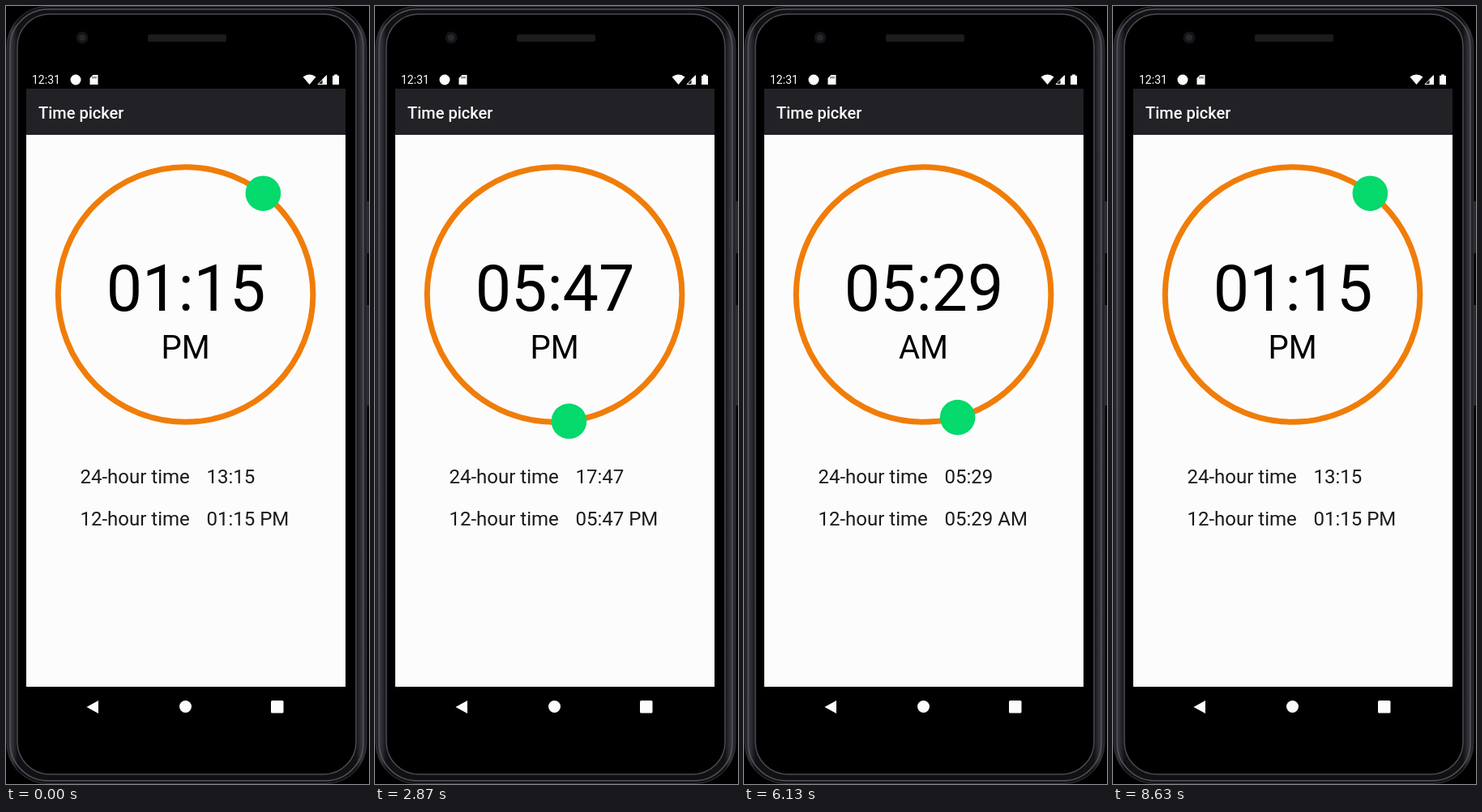
An HTML page that plays this animation: 448 by 960 pixels, repeating every 8660 ms.

```html
<!DOCTYPE html>
<html lang="en">
<head>
<meta charset="utf-8">
<title>Time picker</title>
<style>
  html, body { margin: 0; width: 100%; height: 100%; overflow: hidden; background: #000; }
  svg { display: block; width: 448px; height: 960px; font-family: Roboto, "Noto Sans", sans-serif; }
  .light { fill: #fdfcfd; }
  .label { font-size: 24px; fill: #1a1a1c; }
  .mid { text-anchor: middle; fill: #000; }
</style>
</head>
<body>
<svg viewBox="0 0 448 960">
  <defs>
    <linearGradient id="side">
      <stop offset="0" stop-color="#1b1b1f"/>
      <stop offset=".013" stop-color="#36353c"/>
      <stop offset=".03" stop-color="#111114"/>
      <stop offset=".97" stop-color="#111114"/>
      <stop offset=".987" stop-color="#36353c"/>
      <stop offset="1" stop-color="#1b1b1f"/>
    </linearGradient>
  </defs>

  <!-- Phone body -->
  <g fill="#29292d">
    <rect x="444" y="241" width="4" height="64"/>
    <rect x="444" y="369" width="4" height="124"/>
  </g>
  <rect x="1" y=".5" width="444" height="959" rx="50" fill="url(#side)" stroke="#34343a"/>
  <rect x="5" y="4" width="436" height="952" rx="47" fill="none" stroke="#54535d" stroke-width="1.5"/>
  <rect x="14" y="10" width="418" height="938" rx="40" fill="#000" stroke="#4b4a53" stroke-width="1.5"/>
  <circle cx="94" cy="39" r="7.5" fill="#141417"/>
  <circle cx="94" cy="39" r="4" fill="#27272c"/>
  <rect x="175" y="35" width="97" height="9" rx="2" fill="#1c1c1f"/>

  <!-- Status bar -->
  <g class="light">
    <text x="32" y="96" font-size="14">12:31</text>
    <circle cx="86" cy="91" r="6.5"/>
    <path d="M107.5 85H113.5V97H103.5V89Z"/>
    <path d="M366.5 87.5Q374.5 81.5 382.5 87.5L374.5 97Z"/>
    <path d="M396 85V97H390.5V90.5Z"/>
    <path d="M395.5 86V96.5H385Z" fill="none" stroke="#fdfcfd"/>
    <path d="M405 84.500H409V86H411V97H403V86H405Z"/>
  </g>
  <path d="M107 87v2.500m2-2.500v2.500m2-2.500v2.500" stroke="#000" stroke-width=".8"/>

  <!-- App -->
  <rect x="25" y="102" width="394" height="57" fill="#222126"/>
  <rect x="25" y="159" width="394" height="681" fill="#fdfcfd"/>
  <text class="light" x="40" y="139" font-size="20" font-weight="500">Time picker</text>
  <circle cx="221.6" cy="356" r="157.3" fill="none" stroke="#f07d08" stroke-width="7"/>
  <text id="clock" class="mid" x="222" y="376" font-size="79"></text>
  <text id="half" class="mid" x="221.5" y="435" font-size="40"></text>
  <g class="label">
    <text x="91.500" y="589">24-hour time</text>
    <text x="91.500" y="641">12-hour time</text>
    <text id="full" x="247.500" y="589"></text>
    <text id="short" x="247.500" y="641"></text>
  </g>
  <circle id="knob" r="21.8" fill="#04d96c"/>

  <!-- Navigation -->
  <g class="light">
    <path d="M99.500 865L114 857V873Z"/>
    <circle cx="221.500" cy="864.500" r="7.500"/>
    <rect x="327" y="857" width="15.500" height="15.500" rx="1.500"/>
  </g>
</svg>
<script>
  const LOOP = 8660;
  // Drag path: [time in ms, minutes after noon]
  const drag = [
    [0, 75], [800, 75], [1640, 146], [1970, 192], [3430, 443], [3770, 495],
    [4330, 683], [4870, 793], [5250, 838], [6130, 1049], [7130, 1251],
    [7930, 1450], [8300, 1502], [8560, 1515], [LOOP, 1515]
  ];
  const slope = i => (drag[i + 1][1] - drag[i][1]) / (drag[i + 1][0] - drag[i][0]);

  // Harmonic mean keeps the curve from turning back between points.
  const tangents = drag.map((_, i) => {
    if (i === 0 || i === drag.length - 1) return 0;
    const a = slope(i - 1), b = slope(i);
    return a * b > 0 ? 2 * a * b / (a + b) : 0;
  });

  function minutesAt(t) {
    let i = 0;
    while (i < drag.length - 2 && t >= drag[i + 1][0]) i++;
    const [t0, m0] = drag[i], [t1, m1] = drag[i + 1];
    const d = t1 - t0, u = (t - t0) / d, v = 1 - u;
    return m0 * (1 + 2 * u) * v * v + m1 * (3 - 2 * u) * u * u
      + d * u * v * (tangents[i] * v - tangents[i + 1] * u);
  }

  const el = id => document.getElementById(id);
  const clock = el("clock"), half = el("half"), full = el("full"),
    short = el("short"), knob = el("knob");
  const pad = n => String(n).padStart(2, "0");

  function draw(now) {
    const minutes = Math.round(minutesAt(now % LOOP));
    const angle = minutes / 720 * 2 * Math.PI;
    const hour = Math.floor(minutes / 60 + 12) % 24;
    const min = pad(minutes % 60);
    const time = pad(hour % 12 || 12) + ":" + min;
    const suffix = hour < 12 ? "AM" : "PM";
    clock.textContent = time;
    half.textContent = suffix;
    full.textContent = pad(hour) + ":" + min;
    short.textContent = time + " " + suffix;
    knob.setAttribute("cx", 221.6 + 157.3 * Math.sin(angle));
    knob.setAttribute("cy", 356 - 157.3 * Math.cos(angle));
  }

  const start = performance.now();
  function tick() {
    draw(performance.now() - start);
    requestAnimationFrame(tick);
  }
  tick();
</script>
</body>
</html>
```
